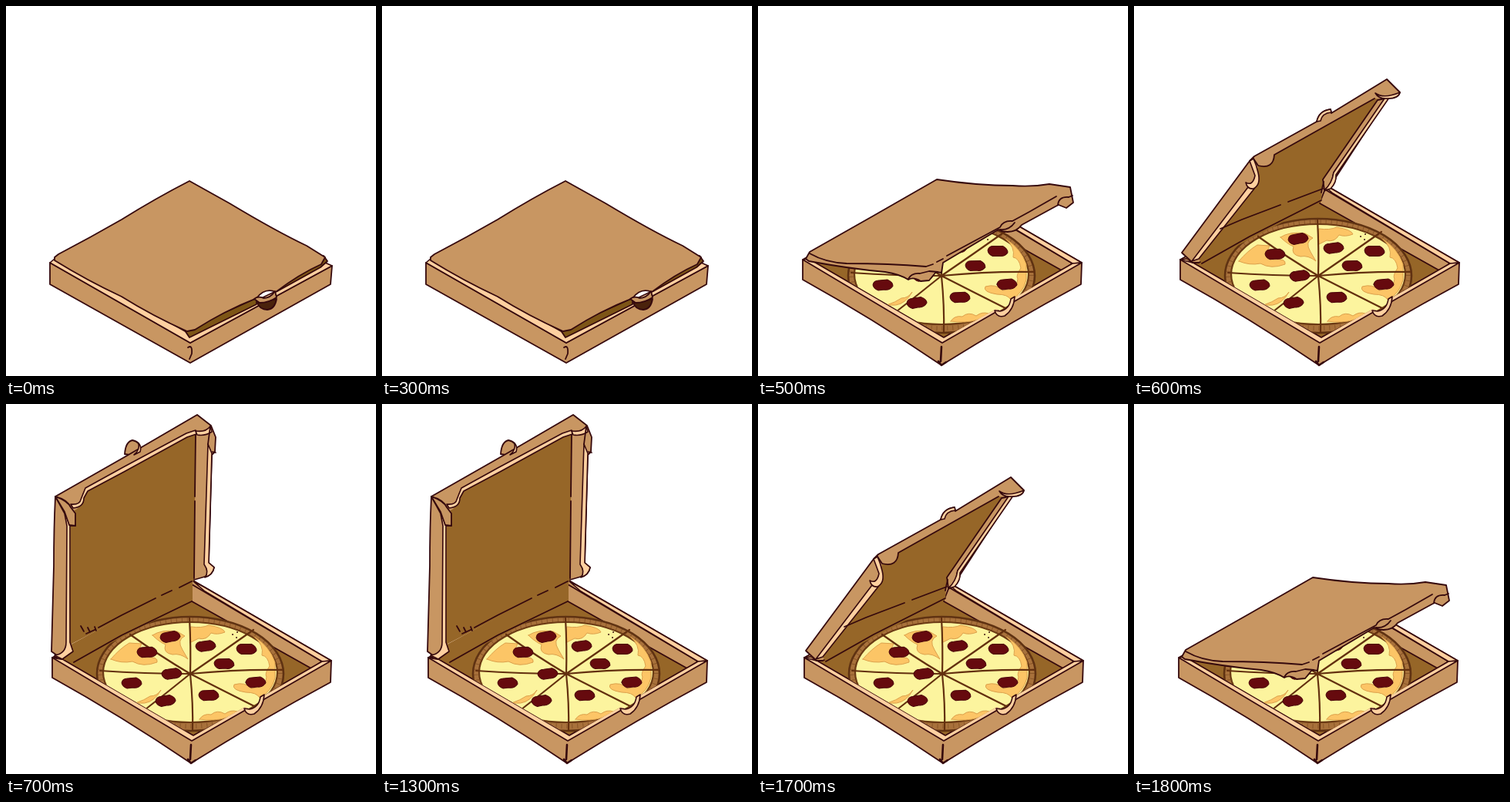
An HTML page that plays this animation: 480x480 px, repeating every 1900 ms.

```html
<!DOCTYPE html>
<html lang="en">
<head>
<meta charset="utf-8">
<title>Pizza box</title>
<style>
html, body { margin: 0; width: 100%; height: 100%; overflow: hidden; background: #fff; }
svg { display: block; width: 100%; height: 100%; }
path, ellipse { stroke: #35090d; stroke-width: 1.8; stroke-linejoin: round; stroke-linecap: round; fill: none; }
.tan { fill: #c89662; }
.light { fill: #fed0a0; stroke-width: 1.6; }
.brown { fill: #966628; }
.shade { fill: #7d5516; }
.dark { fill: #4a220c; }
.flat { stroke: none; }
.bold { stroke-width: 2.6; }
.crust { fill: #a8713b; stroke: #5f3212; stroke-width: 2.6; }
.hatch { stroke: #6b3a14; stroke-width: 6; stroke-dasharray: 1 6; stroke-linecap: butt; opacity: .5; }
.cheese { fill: #fcf49e; stroke: #6b3a14; stroke-width: 2.2; }
.melt { fill: #fcc566; stroke: #dba04c; stroke-width: 1; }
.cut { stroke: #63300f; stroke-width: 2.2; }
.meat { fill: #660a0e; stroke: #4a060a; stroke-width: 1; }
</style>
</head>
<body>
<svg viewBox="0 0 480 480">
<defs>
  <clipPath id="inside"><path d="M68 328L241 236L410 334L333 379Q329 394 317 396L310 393L243 430Z"/></clipPath>

  <g id="pizza" clip-path="url(#inside)">
    <ellipse class="crust" cx="239" cy="350" rx="121" ry="74"/>
    <ellipse class="hatch" cx="239" cy="349" rx="117" ry="69"/>
    <ellipse class="cheese" cx="239" cy="348" rx="113" ry="65"/>
    <path class="melt" d="M136 331Q148 317 160 310L176 311Q168 324 180 329Q198 327 196 335Q178 342 164 334Q150 337 136 331Z"/>
    <path class="melt" d="M190 300Q202 292 222 295L232 301Q221 306 229 319L236 331Q226 323 216 325Q203 323 207 312Q199 309 190 300Z"/>
    <path class="melt" d="M240 289Q254 291 263 287Q282 290 284 296Q274 300 266 297Q260 307 250 304L240 309Z"/>
    <path class="melt" d="M322 302Q342 314 349 335L349 355Q345 373 329 381Q325 374 311 374Q292 371 296 364Q310 360 318 369Q338 368 338 354Q335 350 342 340Q340 327 332 326Q335 313 322 302Z"/>
    <path class="melt" d="M251 409Q256 401 266 403Q274 396 284 402Q292 396 300 399L286 407Q270 412 251 409Z"/>
    <path class="melt" d="M168 388Q180 384 187 379Q196 379 201 371Q193 386 180 388Z"/>
    <path class="cut" d="M238 277Q240 316 239 350Q243 390 242 424M161 299Q200 327 239 350Q282 372 326 394M122 346Q180 350 239 350Q300 344 359 345M321 293Q280 322 239 350Q207 376 172 403"/>
    <g id="meats"></g>
    <path d="M294 299h.1M299 303h.1M300 296h.1"/>
  </g>

  <g id="box">
    <path class="tan" d="M60 329L241 228L422 333L421 361Q330 410 240 466Q150 405 60 355Z"/>
    <path class="brown flat" d="M68 328L241 236L410 334L243 430Z"/>
    <path class="tan" d="M241 234L410 334L396 343L241 256Z"/>
    <path class="light" d="M243 230L258 238L422 333L410 334L258 243Z"/>
    <path class="light" d="M60 329L241 437L422 333L410 334L243 430L68 328Z"/>
    <path class="bold" d="M240 442L239 461M236 461L240 466L246 462"/>
  </g>

  <path id="notch" class="light" d="M309 395Q312 405 322 402Q334 394 335 377L330 380Q328 394 316 396Z"/>
</defs>

<g class="pose">
  <path class="tan" d="M57 333L239 437L423 337L421 361L239 463L57 361Z"/>
  <path class="light" d="M57 333L63 328L236 424L325 382L350 370L414 333L423 337L239 437Z"/>
  <path class="shade" d="M232 421L325 379L325 387L238 430Z"/>
  <path class="shade" d="M349 370L412 324L417 331L408 339L352 370Z"/>
  <path class="tan" d="M63 326L68 322Q110 300 150 277Q195 249 238 227L290 256Q350 292 390 311L414 326L409 335Q380 348 350 371Q336 365 325 379Q284 395 245 420L235 422Q190 402 150 377Q105 356 63 330Z"/>
  <path class="dark" d="M326 385L351 380Q349 393 339 394Q329 394 326 385Z"/>
  <path class="tan" d="M322 380Q327 376 334 379Q343 379 349 370L351 378Q341 385 329 385Z"/>
  <path d="M236 443Q242 439 241 451L238 458"/>
</g>

<g class="pose">
  <use href="#box" x="-2"/><use href="#pizza" x="-1"/><use href="#notch" x="-2"/>
  <path class="tan" d="M62 328L67 319L150 272L232 225Q285 233 330 233Q355 235 378 231L405 235L409 255L400 262L390 258L386 260L342 284Q333 296 316 292L312 290L240 333L238 346L231 345L222 356L211 357Q202 351 195 355Q184 348 165 345Q120 341 66 331Z"/>
  <path d="M67 321Q88 333 115 334Q170 334 218 338L227 335M232 332L240 328M245 324L314 287Q318 278 330 279L352 267L387 247M389 258Q390 247 403 248L408 246M314 290Q326 291 333 281M195 354Q199 346 210 347L222 344L233 345"/>
</g>

<g class="pose">
  <use href="#box"/><use href="#pizza"/><use href="#notch"/>
  <path class="brown flat" d="M68 329L84 313L245 230L243 254L88 335Z"/>
  <path class="tan" d="M62 320L150 201L156 195L237 150Q240 136 255 134L256 139L328 95L345 112Q344 120 329 119L262 222Q260 234 247 240L243 250L84 333L76 333Z"/>
  <path class="brown flat" d="M84 328L156 235L161 207Q181 212 182 193L312 120L322 121L245 225L243 252L88 334Z"/>
  <path class="tan" d="M316 122L326 120L259 216Q257 232 247 239L245 225Z"/>
  <path class="light" d="M325 120L259 216Q257 230 247 239L255 237Q263 229 262 219L331 119Z"/>
  <path class="light" d="M151 231L75 331L84 328L156 237Z"/>
  <path class="light" d="M150 201L155 198Q159 207 161 216Q165 232 155 237Q147 238 145 229Q154 234 157 220Z"/>
  <path class="light" d="M313 113Q324 121 345 112Q343 121 326 120Q317 120 313 113Z"/>
  <path class="light" d="M237 150Q240 136 255 134L256 138Q244 139 242 149Z"/>
  <path d="M155 198L161 207Q181 212 182 193L312 120M245 237L200 254M190 258L140 277L112 289M88 334L150 299L243 252M246 228L243 242M60 329L76 333"/>
</g>

<g class="pose">
  <use href="#box"/><use href="#pizza"/><use href="#notch"/>
  <path class="brown flat" d="M70 330L84 312L242 227L242 255L88 335Z"/>
  <path class="tan" d="M154 65Q155 49 164 47Q175 49 174 60L167 67Z"/>
  <path class="tan flat" d="M64 120L157 67L248 14L266 28L272 43L271 62L267 66L263 206L270 212Q268 222 258 224L242 228L84 312L83 322L73 331L59 321L62 210Z"/>
  <path class="brown flat" d="M83 312L84 155L89 138Q101 132 99 116L235 43L246 39L244 229Z"/>
  <path d="M244 228L258 224Q268 222 270 212L263 206L267 66L271 62L272 43L266 28L248 14L157 67L64 120Q62 160 62 210L59 321L73 331L83 322"/>
  <path class="light" d="M97 124L103 109L152 82L234 38L246 34L247 39L235 43L153 88L106 113L101 122Q101 134 87 135L84 130Q96 131 97 124Z"/>
  <path class="light" d="M64 120Q80 124 84 134L90 158L83 158L83 309L87 321L73 331L63 326Q78 324 78 309L79 158L76 142Z"/>
  <path class="tan" d="M64 120Q80 126 84 134L90 142L90 158L82 157L76 140Z"/>
  <path class="light" d="M246 35Q259 37 265 29L267 36Q258 42 248 40Z"/>
  <path class="light" d="M262 52L267 64L263 206L270 212Q268 222 258 225Q264 218 257 208Z"/>
  <path class="light" d="M166 66Q174 60 172 51Q176 55 174 62Z"/>
  <path d="M246 40L245 120M245 126L244 226M265 29L262 52M272 63L268 62M241 230L225 238M215 242L202 248M194 252L150 274L120 290M115 293L104 298M97 288L101 295M106 290L109 296M115 289L117 294M88 335L150 300L241 256M60 329L72 331"/>
</g>
</svg>
<script>
const spots = [[213, 302], [183, 322], [259, 314], [312, 318], [163, 362],
  [215, 350], [283, 337], [324, 361], [207, 385], [263, 378]];
document.getElementById('meats').innerHTML = spots.map(([x, y], i) =>
  `<path class="meat" transform="translate(${x} ${y}) rotate(${i * 7 % 11 - 5})" d="M-13 0Q-12 -6 -5 -6L6 -7Q13 -4 13 1Q9 7 2 6L-6 7Q-12 5 -13 0Z"/>`
).join('');

// [start time in ms, pose]
const steps = [[0, 0], [500, 1], [600, 2], [700, 3], [1700, 2], [1800, 1]];
const poses = [...document.querySelectorAll('.pose')];
const start = performance.now();

function draw(now) {
  const t = Math.max(0, now - start) % 1900;
  const current = steps.filter(([from]) => from <= t).pop()[1];
  poses.forEach((p, i) => p.style.display = i === current ? '' : 'none');
  requestAnimationFrame(draw);
}
draw(start);
</script>
</body>
</html>
```
